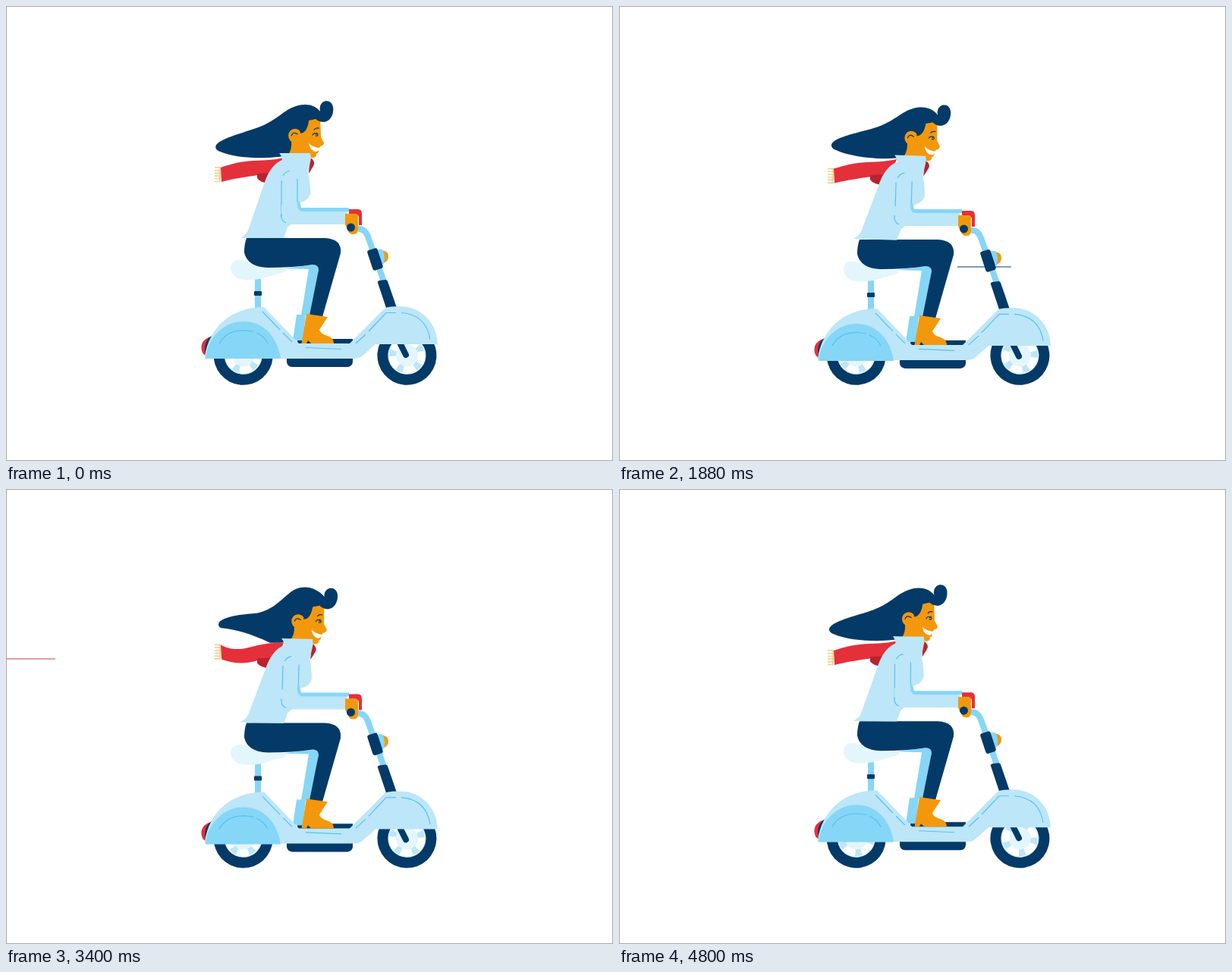
Write an HTML page that moves like this. It is 800 px wide and 600 px high and loops after 4840 ms.

```html
<!DOCTYPE html>
<html lang="en">
<head>
<meta charset="utf-8">
<title>Scooter ride</title>
<style>
  html, body { margin: 0; height: 100%; overflow: hidden; background: #fff; }
  svg { display: block; width: 800px; height: 600px; }
  .navy { fill: #033a68; }
  .pale { fill: #bde6f8; }
  .sky { fill: #86d6f7; }
  .ice { fill: #e2f6fc; }
  .skin { fill: #f3980c; }
  .red { fill: #e4303b; }
  .dark { fill: #b9232f; }
  .seam { fill: none; stroke: #55c3ef; stroke-width: 1.2; }
  .ink { fill: none; stroke: #033a68; stroke-width: 1.2; stroke-linecap: round; }
</style>
</head>
<body>
<svg viewBox="0 0 800 600">
  <defs>
    <g id="wheel">
      <circle class="navy" r="39"/>
      <circle class="ice" r="25"/>
      <circle r="19" fill="none" stroke="#fff" stroke-width="9"/>
      <circle r="19" fill="none" stroke="#bde6f8" stroke-width="9" stroke-dasharray="8 15.876"/>
    </g>
  </defs>
  <g id="streaks"></g>

  <use href="#wheel" class="spin" data-x="312.7"/>
  <use href="#wheel" class="spin" data-x="528.4"/>

  <g id="ride">
    <path d="M520 446L527 460" stroke="#033a68" stroke-width="8" stroke-linecap="round"/>
    <rect class="sky" x="328" y="355" width="8" height="45"/>
    <rect class="navy" x="327" y="376" width="10" height="6" rx="1"/>
    <path class="ice" d="M301 336Q309 333 318 337Q330 345 369 346V350Q345 357 335 360Q315 363 305 359Q296 354 296 345Q297 338 301 336Z"/>
    <rect class="navy" x="370" y="455" width="87" height="21" rx="7"/>
    <rect class="navy" x="384" y="439" width="73" height="10"/>
    <path class="sky" d="M365 346L405 341Q413 341 412 348L402 408H389L399 347Z"/>
    <path class="sky" d="M383 407H395L391 441H378Z"/>
    <path d="M464 294Q473 293 477 304L501 372" fill="none" stroke="#86d6f7" stroke-width="8"/>
    <path class="navy" d="M490 365Q489 363 492 362L500 361Q502 361 503 363L515 398H501Z"/>
    <path class="skin" d="M495 322Q504 323 504 330Q504 337 497 339Z"/>
    <path class="sky" d="M490 321L496 321Q501 330 498 340L493 341Z"/>
    <rect class="navy" x="479.5" y="320" width="14" height="28" rx="3" transform="rotate(-18 486.5 334)"/>
    <g id="tail">
      <path class="red" d="M270 436Q257 440 257.500 451Q258 460 264 461Z"/>
      <path class="navy" d="M273 434Q259 440 263 461H268Z"/>
    </g>
    <path class="pale" d="M262 463C267 425 296 397 340 397L386 445H453L499 399Q502 396 520 396C550 397 568 420 569 446H487L469 462Q465 465 460 465H262Z"/>
    <path class="seam" d="M338 403L361 427M365 431L377 443M395 450.500L442 452.500M461 445L474 433M478 429L501 404.500H514M521 404.500Q554 407 559 440"/>
    <g id="fender">
      <path class="sky" d="M263 465C266 434 290 416 313 416C341 416 358 438 362 465Z"/>
      <path class="seam" d="M281 445Q290 428 313 427.500L326 429M330 431Q340 435 345 445"/>
    </g>
    <path class="navy" d="M317 306H420Q443 307 441 326L417 410L400 408L412 348Q412 341 404 341Q380 345 345 345Q318 344 314 325Q314 314 317 306Z"/>
    <path class="skin" d="M396 406L424 410L413 427Q414 432 424 435Q432 438 432 445H402L398 441L396 445H389.500Z"/>

    <path id="fringe" fill="none" stroke="#f4cf86" stroke-width="1.600"/>
    <path id="scarf" class="red"/>
    <path class="dark" d="M331 221L352 220L348 234Q335 233 331 227Z"/>

    <g id="head">
      <path class="skin" d="M396 146L414 149L415 173L419 180Q419 184 414 185L412 191Q412 194 409 195Q410 200 403 200L371 197L374 165Z"/>
      <path fill="#fff" d="M399 181Q405 187 414 187Q411 194 405 191Q400 188 399 181Z"/>
      <path class="ink" d="M404 170Q406 166 409 169M409 167.500Q411 168 411 170Q410 172 408 171M406 163Q408 160 412 161"/>
      <path id="hair" class="navy"/>
      <ellipse class="skin" cx="380" cy="171" rx="8" ry="9"/>
      <path class="ink" d="M376 171Q378 165 384 169"/>
    </g>
    <g id="torso">
      <path class="dark" d="M400 199Q409 205 405 211L399 221Z"/>
      <path class="pale" d="M360 194H401L402 200L398 221Q402 238 401 248Q398 257 387 259L384 280L371 292L366 306H309Q316 302 319 296L341 232Q349 209 364 203Q363 197 360 194Z"/>
      <path class="seam" d="M363 279V230M365 224Q368 218 374 217.500M384 228V259"/>
    </g>
    <path class="pale" d="M363 262V277Q363 288 374 288H449V269H384V262Z"/>
    <path class="sky" d="M384 256L387 258L389 266H452V271H392Q384 271 384 262Z"/>
    <path class="seam" d="M363 274V279Q364 284 369 286"/>
    <path class="skin" d="M447 274H464V296Q463 301 458 301Q451 301 451 295L447 289Z"/>
    <path class="red" d="M452 268H464Q469 268 469 274V289H465V278Q464 274 460 274H452Z"/>
    <circle class="navy" cx="454.500" cy="292" r="5.500"/>
  </g>
  <rect x=".5" y=".5" width="799" height="599" fill="none" stroke="#aaa"/>
</svg>
<script>
const LOOP = 4840, STEP = 40, SPEED = 75.3;
const $ = id => document.getElementById(id);
const spinners = document.querySelectorAll('.spin');
const NAVY = '#033a68', RED = '#cf3a48', PALE = '#bfe8f3';

// colour, y, right end at step zero, length, clip range
const wind = (color, y, enter) => [color, y, 818 + SPEED * enter, 71, 0, 800];
const ground = (tail, step) => [NAVY, 499.5, tail + SPEED * step, 440, 180, 620];
const streaks = [
  wind(RED, 224, 2), wind(NAVY, 344, 12.92), wind(PALE, 274, 27),
  wind(NAVY, 344, 43), wind(NAVY, 374, 55.92), wind(RED, 224, 75),
  wind(PALE, 274, 87), wind(NAVY, 344, 103),
  ground(374, 15), ground(490, 75)
].map(([color, ...rest]) => {
  const el = document.createElementNS('http://www.w3.org/2000/svg', 'path');
  el.setAttribute('stroke', color);
  el.setAttribute('stroke-width', color === PALE ? 1.6 : 1);
  $('streaks').append(el);
  return [el, ...rest];
});

// 0 at the top of a cycle, 1 halfway through it
const swing = (turns, lag = 0) => (1 - Math.cos(2 * Math.PI * (turns - lag))) / 2;
const set = (el, name, value) => el.setAttribute(name, value);

function drawHair(w) {
  set($('hair'), 'd', `M414 ${139 - 2 * w}C${404 - 5 * w} ${127 - 5 * w} ${386 - 7 * w} ${127 - 5 * w} ${368 - 2 * w} ${139 - 3 * w}
    C${358 - w} ${146 - 3 * w} ${350 - 2 * w} ${153 + 4 * w} ${335 - 9 * w} ${159 + 4 * w}
    C${318 - 6 * w} ${166 - w} ${290 + w} ${172 - 5 * w} 279 ${181 - 6 * w}
    C274 ${185 - 6 * w} 276 ${190 - 5 * w} 282 ${192 - 7 * w}
    C298 ${199 - 13 * w} ${325 - 7 * w} ${201 - 11 * w} 345 ${200 + w}
    Q366 ${199 + 2 * w} 372 196Q377 188 376 179V170Q374 162 382 162Q388 163 388 168Q397 167 399 151L408 149
    Q412 153 419 153C427 152 432 144 431 134C430 126 423 123 417 127Q412 132 414 ${139 - 2 * w}Z`);
}

function drawScarf(w) {
  const tip = 212 - 10 * w;
  set($('scarf'), 'd', `M283 ${tip + 1}C292 ${210 - 2 * w} 303 ${206 + 5 * w} 320 ${204.5 + 2 * w}
    S350 ${204 - 4 * w} 366 200L356 226L333 223
    C318 ${225 + 3 * w} 302 ${227 + 2 * w} 284 ${tip + 20}Z`);
  let d = `M282 ${tip}V${tip + 20}`;
  for (let i = 0; i < 6; i++) d += `M275 ${tip + 1 + i * 3.7}H283`;
  set($('fringe'), 'd', d);
}

function draw(time) {
  const step = Math.floor(time % LOOP / STEP);
  const loop = step * STEP / LOOP;
  const bob = swing(loop * 12), lean = swing(loop * 12, .05), wave = swing(loop * 5);
  const tilt = `rotate(${1.8 * lean} 340 305)`;
  set($('ride'), 'transform', `translate(0 ${2.5 * bob})`);
  set($('fender'), 'transform', `translate(0 ${1.2 * lean})`);
  set($('tail'), 'transform', `translate(0 ${lean})`);
  set($('torso'), 'transform', tilt);
  set($('head'), 'transform', `${tilt} rotate(${1.5 * lean} 385 200)`);
  drawHair(wave);
  drawScarf(wave);
  for (const el of spinners)
    set(el, 'transform', `translate(${el.dataset.x} 460.8) rotate(${loop * 12 * 360 - 40})`);
  for (const [el, y, start, length, lo, hi] of streaks) {
    const end = start - SPEED * step;
    const a = Math.max(lo, end - length), b = Math.min(hi, end);
    set(el, 'd', b > a ? `M${a} ${y}H${b}` : '');
  }
}

const begin = performance.now();
(function tick() {
  draw(performance.now() - begin);
  requestAnimationFrame(tick);
})();
</script>
</body>
</html>
```
